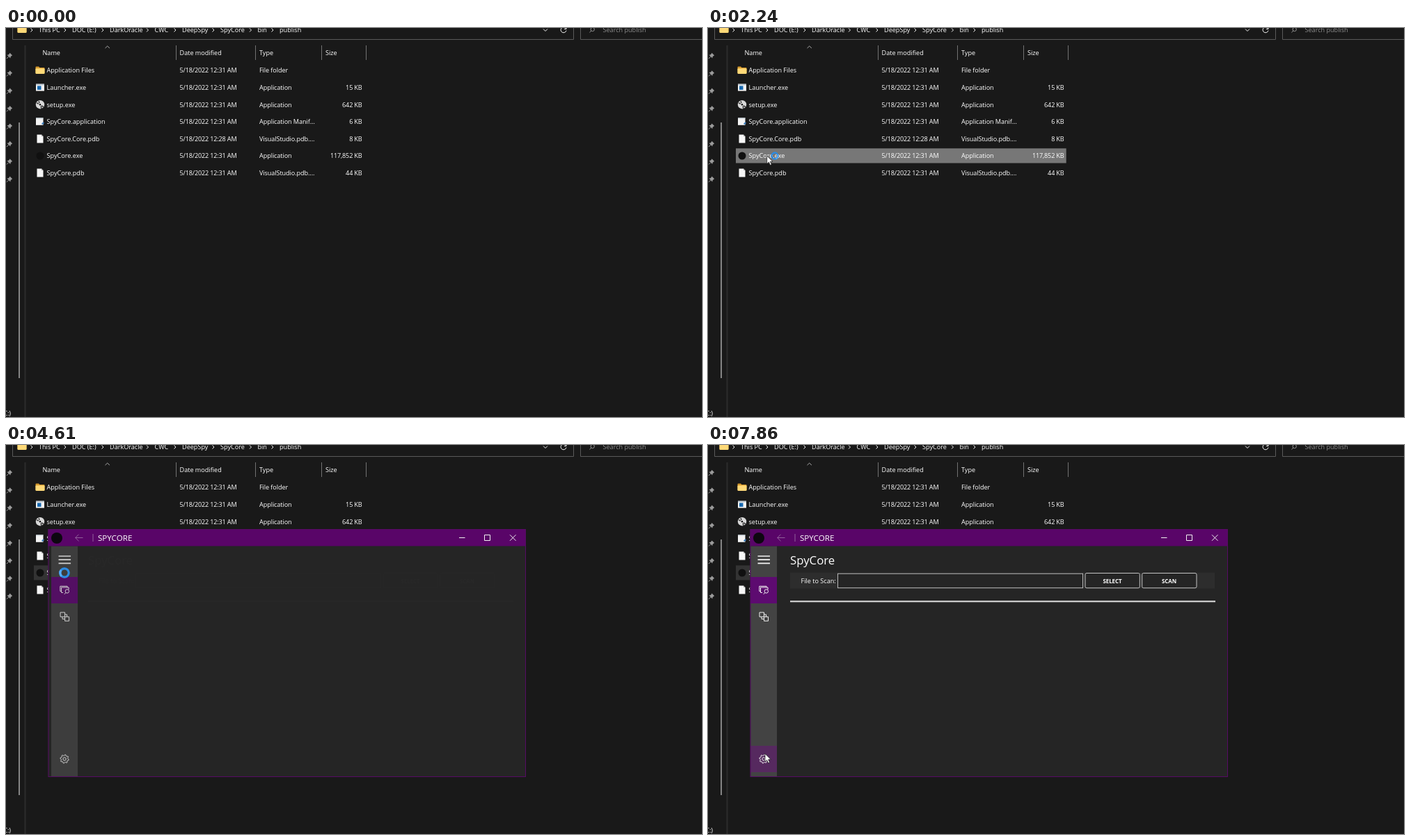
An HTML page for the animation above (8 s loop, 1000 by 560 pixels).

```html
<!DOCTYPE html>
<html lang="en">
<head>
<meta charset="utf-8">
<title>File window</title>
<style>
html, body { margin: 0; width: 1000px; height: 560px; overflow: hidden; background: #191919; }
svg { display: block; }
text { font-family: "Open Sans", "Noto Sans", sans-serif; font-size: 9.1px; fill: #fff; }
.num { letter-spacing: -.17px; }
.type { letter-spacing: -.08px; }
.line { fill: none; stroke: #f2f2f2; stroke-width: 1; }
</style>
</head>
<body>
<svg width="1000" height="560" viewBox="0 0 1000 560">
  <defs>
    <g id="folder">
      <path d="M-6.5-4.5q0-1 1-1h3.5l1.5 1.5H5.5q1 0 1 1V4h-13z" fill="#d79b2e"/>
      <rect x="-6.5" y="-2.8" width="13" height="7.8" rx="1" fill="#ffd978"/>
    </g>
    <g id="page">
      <path d="M-4.5-6H2L4.5-3.5V6h-9z" fill="#f7f7f7"/>
      <path d="M2-6v2.5h2.5z" fill="#a9a9a9"/>
    </g>
    <g id="program">
      <rect x="-6" y="-5" width="12" height="10" fill="#f4f4f4"/>
      <path d="M-6-5H6v1.8H-6z" fill="#b9c4cc"/>
      <rect x="-4" y="-2.2" width="5.5" height="5.5" fill="#1668b0"/>
    </g>
    <g id="manifest">
      <rect x="-6" y="-5.5" width="10.5" height="10.5" fill="#f4f4f4"/>
      <path d="M-6-5.5H4.5v1.2H-6z" fill="#b9c4cc"/>
      <path d="M2 3l2.5-2.5L6 2 3.5 4.5z" fill="#3c7dbd"/>
    </g>
    <g id="disc">
      <circle r="6.2" fill="#d8d8d8"/>
      <path d="M-5-2.5L-1-.5M1 1l4 2.5M-2-5l1.5 3.5M1 2l1 4" stroke="#444" stroke-width="1.6"/>
      <circle r="2" fill="#191919" stroke="#fff"/>
    </g>
    <circle id="badge" r="5.5" fill="#101010"/>
    <g id="pin" fill="#9b9b9b">
      <path d="M.5-4.2L4.2-.5 3 .1 1.6 1.5 1.3 3.6-3.6-1.3-1.5-1.6-.1-3z"/>
      <path d="M-1.2 1.2L-4 4" stroke="#9b9b9b"/>
    </g>
  </defs>

  <path d="M27.5 25V560" stroke="#2c2c2c" stroke-width="2"/>
  <path d="M19 136V504" stroke="#a0a0a0" stroke-width="1.6"/>
  <path d="M9.5-5V16.5H815.5V-5M825.5-5V16.5H1005" fill="none" stroke="#5a5a5a"/>
  <use href="#folder" x="23" y="2"/>
  <g class="line">
    <path d="M772 1.5l3 3 3-3"/>
    <path d="M804.6.8A4 4 0 1 0 805 3.6M805-1.5V1.4H802"/>
    <path d="M838.5 6.5l2.4-2.6" stroke="#8c8c8c"/>
    <circle cx="842.7" cy="2" r="2.7" stroke="#8c8c8c"/>
    <path d="M142.5 29l3.2-3 3.2 3" stroke="#aaa"/>
    <path d="M244.5 25V46M358.5 25V46M453.5 25V46M517.5 25V46" stroke="#727272"/>
  </g>
  <text x="857.5" y="6.3" style="fill:#8c8c8c">Search publish</text>
  <text x="7" y="557.5" text-anchor="end">C:)</text>
  <rect id="row" x="40" y="173.3" width="474.7" height="21.2"/>
  <g id="files"></g>

  <g id="win">
    <rect x="60.5" y="121" width="686.5" height="357" fill="#252525"/>
    <g id="body">
      <text x="118" y="171.8" style="font-size:16.8px">SpyCore</text>
      <rect x="118" y="183.7" width="610" height="23" fill="#2d2d2d"/>
      <text x="133.5" y="199">File to Scan:</text>
      <rect x="186.5" y="185.2" width="352" height="20.5" fill="#252525" stroke="#b9b9b9"/>
      <g fill="#252525" stroke="#c4c4c4">
        <rect x="542" y="184.5" width="78.3" height="21.3" rx="2"/>
        <rect x="623.7" y="184.5" width="78.3" height="21.3" rx="2"/>
      </g>
      <g text-anchor="middle" font-weight="700">
        <text x="581" y="198.6" style="font-size:7.9px">SELECT</text>
        <text x="662.6" y="198.6" style="font-size:7.9px">SCAN</text>
      </g>
      <rect x="118" y="224" width="611" height="2.3" fill="#c9c9c9"/>
    </g>
    <g id="nav">
      <rect x="61" y="145.5" width="38" height="332" fill="#434343"/>
      <rect id="menuHover" x="61" y="145.5" width="38" height="38" fill="#7d7d7d"/>
      <rect id="picked" x="61" y="190" width="38" height="38" fill="#5d0b70"/>
      <rect id="gearHover" x="61" y="433" width="38" height="38" fill="#56295f"/>
      <g class="line">
        <path d="M71.5 160H89M71.5 165.2H89M71.5 170.4H89" stroke-width="1.7"/>
        <path d="M78 212.5H75.5V205H86V208M75.5 210.5H73.8V203.3H84V205"/>
        <circle cx="83.8" cy="210.5" r="2.7"/>
        <path d="M82 212.5l-2.3 2.4"/>
        <path d="M74 241h6.5v6.3H74zM80.5 247.3h6v6h-6zM77 247.3v3.2h3.5M80.5 244H83.5v3.3"/>
        <g id="gear"><circle cx="80" cy="452" r="2.2"/></g>
      </g>
    </g>
    <path d="M60.5 121H747V145.5H60.5z" fill="#590568"/>
    <rect id="edge" x="61" y="121.5" width="685.5" height="356" fill="none"/>
    <circle cx="73" cy="134" r="8" fill="#0d0710"/>
    <g class="line">
      <path d="M110.5 133.5H99.7M104.5 128.7l-4.8 4.8 4.8 4.8M125 128V139" stroke="#91609b"/>
      <path d="M651 133.5h8.5M687.5 129.5h8v8h-8zM724 129.3l8.5 8.5M732.5 129.3l-8.5 8.5"/>
    </g>
    <text x="132" y="138" style="font-size:11.6px">SPYCORE</text>
  </g>

  <g id="ring" fill="none" stroke-width="3.2">
    <circle r="6.2" stroke="#2c8ce4"/>
    <path d="M0-6.2A6.2 6.2 0 0 1 6.2 0" stroke="#55aaf6"/>
  </g>
  <path id="arrow" d="M0 0V11.5L2.7 9 4.6 13.4 6.6 12.5 4.7 8.3H8.3Z" fill="#fff" stroke="#111" stroke-width=".7"/>
</svg>
<script>
const LOOP = 8000;
const $ = id => document.getElementById(id);
const text = (x, y, s, extra = '') => `<text x="${x}" y="${y}" ${extra}>${s}</text>`;
const icon = (name, x, y) => `<use href="#${name}" x="${x}" y="${y}"/>`;

function buildFiles() {
  const crumbs = [['This PC', 47], ['DOC (E:)', 95], ['DarkOracle', 149], ['CWC', 213.5],
    ['DeepSpy', 253], ['SpyCore', 308], ['bin', 361.5], ['publish', 393]];
  const rows = [
    ['folder', 'Application Files', '31', 'File folder', ''],
    ['program', 'Launcher.exe', '31', 'Application', '15 KB'],
    ['disc', 'setup.exe', '31', 'Application', '642 KB'],
    ['manifest', 'SpyCore.application', '31', 'Application Manif...', '6 KB'],
    ['page', 'SpyCore.Core.pdb', '28', 'VisualStudio.pdb....', '8 KB'],
    ['badge', 'SpyCore.exe', '31', 'Application', '117,852 KB'],
    ['page', 'SpyCore.pdb', '31', 'VisualStudio.pdb....', '44 KB']
  ];
  let out = '';
  for (const [name, x] of crumbs)
    out += text(x, 6.3, name) + `<path class="line" d="M${x - 11.5} .5l2.5 2.5-2.5 2.5"/>`;
  [['Name', 52.5], ['Date modified', 249.5], ['Type', 364], ['Size', 459]]
    .forEach(([name, x]) => out += text(x, 38.8, name));
  rows.forEach(([kind, name, minute, type, size], i) => {
    const y = 61 + 24.6 * i, base = y + 3.3;
    out += icon(kind, 49, y) + text(58.5, base, name)
      + text(249.5, base, `5/18/2022 12:${minute} AM`, 'class="num"')
      + text(364, base, type, 'class="type"')
      + text(511.5, base, size, 'class="num" text-anchor="end"');
  });
  for (let i = 0; i < 8; i++) out += icon('pin', 5, 40 + 25.4 * i);
  $('files').innerHTML = out;
}

function buildGear() {
  let d = '';
  for (let i = 0; i < 32; i++) {
    const a = (i + .5) * Math.PI / 16, r = i % 4 < 2 ? 6.2 : 4.8;
    d += `${i ? 'L' : 'M'}${(80 + r * Math.cos(a)).toFixed(2)} ${(452 + r * Math.sin(a)).toFixed(2)}`;
  }
  $('gear').innerHTML += `<path d="${d}Z"/>`;
}

const clamp = v => Math.max(0, Math.min(1, v));
const mix = (a, b, p) => a + (b - a) * p;
const smooth = p => p * p * (3 - 2 * p);
const show = (id, on) => $(id).style.display = on ? '' : 'none';
// Time held at the last of n even steps between two moments.
const held = (t, from, to, n) => {
  const gap = (to - from) / (n - 1);
  return t < from || t > to ? t : from + Math.floor((t - from) / gap + .001) * gap;
};

function pointer(t) {
  if (t < 970) {
    const p = clamp((held(t, 190, 970, 12) - 190) / 680);
    const e = 1 - (1 - p) ** 2.4;
    return [mix(893, 80, e), mix(533, 182, e)];
  }
  if (t < 1100) return [83, 181];
  if (t < 7600) {
    const p = clamp((held(t, 1100, 1230, 3) - 1035) / 195);
    return [mix(83, 84.7, p), mix(181, 184, p)];
  }
  const p = clamp((held(t, 7600, 7860, 5) - 7535) / 325);
  return [mix(84.7, 82, p) - 8 * Math.sin(Math.PI * p), mix(184, 444.5, smooth(p))];
}

function draw(t) {
  const [x, y] = pointer(t);
  const waiting = t >= 4330 && t < 4870;
  const starting = t >= 1440 && t < 3390;
  const open = t >= 4395;

  show('arrow', t >= 190 && !waiting);
  $('arrow').setAttribute('transform', `translate(${x} ${y})`);

  show('ring', waiting || starting);
  const spin = held(t, 1440, 3390, 27) * .36;
  $('ring').setAttribute('transform', waiting
    ? `translate(84 184) rotate(${spin})`
    : `translate(96 184) scale(.72) rotate(${spin})`);

  const over = x < 515 && y < 195;
  show('row', t >= 190 && over || open);
  $('row').setAttribute('fill', open ? '#333' : t >= 1370 ? '#777' : '#4d4d4d');

  show('win', open);
  if (!open) return;
  const s = held(t, 4330, 5010, 11);
  const grow = 1 - .045 * (1 - clamp((s - 4396) / 140)) ** 2.2;
  $('win').setAttribute('transform', `translate(403.7 299.3) scale(${grow}) translate(-403.7 -299.3)`);
  $('win').setAttribute('opacity', s < 4460 ? .5 : 1);
  $('edge').setAttribute('stroke', s < 4600 ? '#68087a' : '#570b65');

  const slide = clamp((s - 4396) / 350), rest = (1 - slide) ** 2;
  $('nav').setAttribute('transform', `translate(${24 * rest} 0)`);
  $('nav').setAttribute('opacity', 1 - rest);
  $('body').setAttribute('opacity', clamp((s - 4600) / 200));
  show('picked', s >= 4600);
  show('menuHover', s >= 4870 && y < 190);
  show('gearHover', y >= 433);
}

buildFiles();
buildGear();
const begin = performance.now();
function tick() {
  draw((performance.now() - begin) % LOOP);
  requestAnimationFrame(tick);
}
tick();
</script>
</body>
</html>
```
